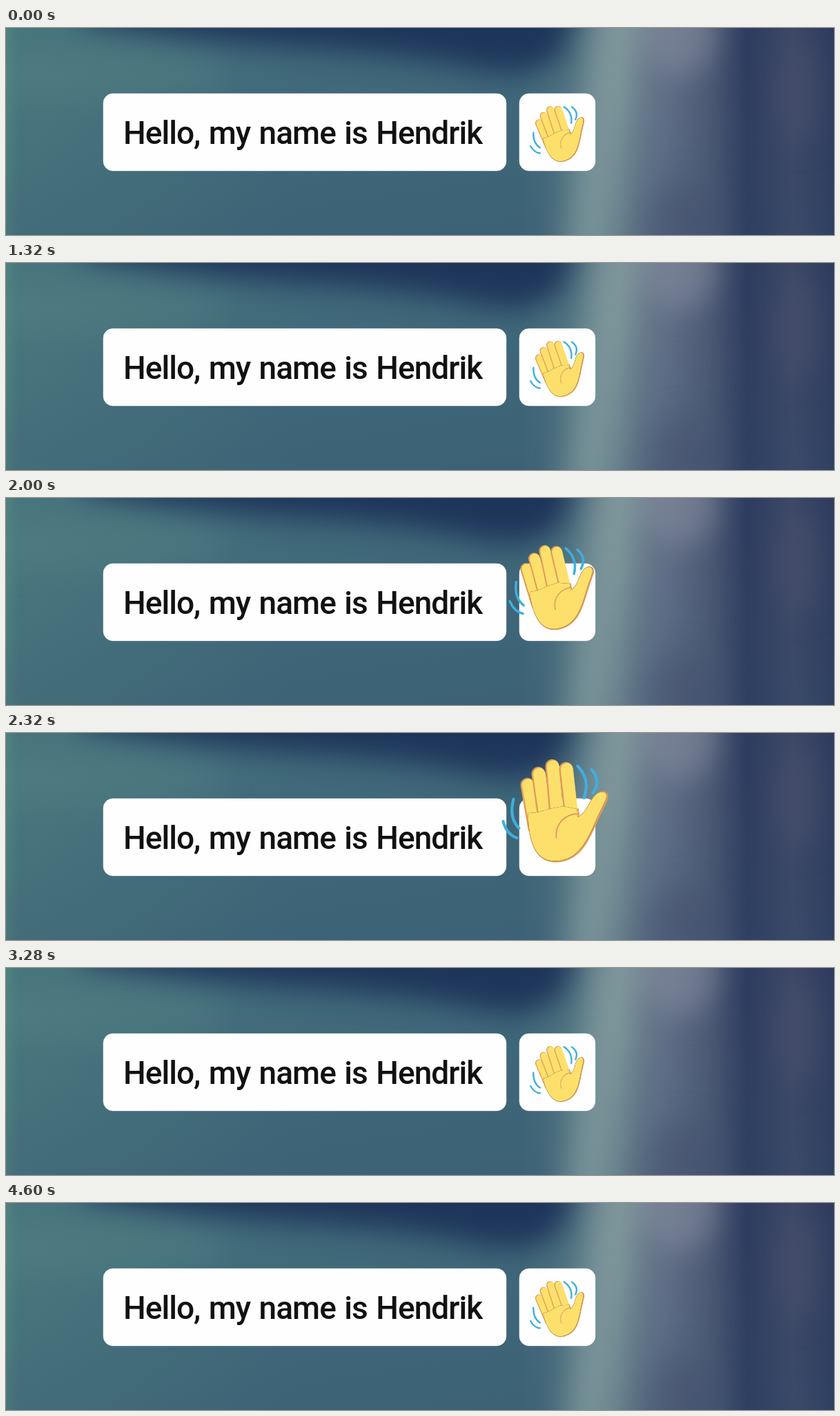
Animation of 1200x300 px, one loop 4960 ms. Source, as an HTML page:

```html
<!DOCTYPE html>
<html lang="en">
<head>
<meta charset="utf-8">
<title>Hello</title>
<style>
  html, body { margin: 0; width: 100%; height: 100%; overflow: hidden; background: #3f6678; }
  svg { display: block; width: 100vw; height: 100vh; }
  text { font: 500 46px Roboto, "Open Sans", sans-serif; letter-spacing: -1px; word-spacing: 2px; fill: #111; }
  .line { fill: none; stroke-linecap: round; stroke-linejoin: round; }
</style>
</head>
<body>
<svg viewBox="0 0 1200 300" preserveAspectRatio="none">
  <defs>
    <linearGradient id="base">
      <stop offset="0" stop-color="#50827f"/>
      <stop offset=".015" stop-color="#48767d"/>
      <stop offset=".35" stop-color="#40697a"/>
      <stop offset=".62" stop-color="#3f6779"/>
      <stop offset=".68" stop-color="#4f7280"/>
      <stop offset=".74" stop-color="#6d838f"/>
      <stop offset=".8" stop-color="#5f6d86"/>
      <stop offset=".85" stop-color="#4c5974"/>
      <stop offset=".895" stop-color="#303e60"/>
      <stop offset=".95" stop-color="#3d4867"/>
      <stop offset="1" stop-color="#2e3b5e"/>
    </linearGradient>
    <linearGradient id="shade" x2="0" y2="1">
      <stop offset=".35" stop-color="#34506c" stop-opacity="0"/>
      <stop offset="1" stop-color="#34506c" stop-opacity=".25"/>
    </linearGradient>
    <filter id="soft" x="-50%" y="-50%" width="200%" height="200%" color-interpolation-filters="sRGB">
      <feGaussianBlur stdDeviation="20"/>
    </filter>
  </defs>

  <rect width="1200" height="300" fill="url(#base)"/>
  <rect width="1200" height="300" fill="url(#shade)"/>
  <g filter="url(#soft)">
    <ellipse cx="130" cy="65" rx="190" ry="40" fill="#558285" opacity=".4"/>
    <path d="M110-60H835L808 35Q770 78 680 58T430 28T110-10Z" fill="#1e355a"/>
    <path d="M870-60H925L895 150L875 360H805L828 150Z" fill="#86a0a2" opacity=".7"/>
    <ellipse cx="975" cy="5" rx="55" ry="65" fill="#848d9d" opacity=".6"/>
    <ellipse cx="980" cy="290" rx="50" ry="70" fill="#44516f" opacity=".5"/>
    <path d="M1055-60H1095L1075 150L1110 360H1080Z" fill="#293860" opacity=".4"/>
    <ellipse cx="1150" cy="95" rx="30" ry="75" fill="#4a526e" opacity=".6"/>
  </g>

  <g fill="#fefeff" stroke="#fff" stroke-opacity=".4">
    <rect x="141" y="95" width="584" height="112" rx="14"/>
    <rect x="744" y="95" width="110" height="112" rx="14"/>
  </g>
  <text x="170" y="168">Hello, my name is Hendrik</text>

  <g id="hand">
    <g class="line" stroke="#3eafdf" stroke-width="4.2">
      <path d="M736 96Q729 123 744 138M721 128Q726 147 741 152"/>
      <path d="M829 48Q848 68 838 94M849 53Q864 69 851 87"/>
    </g>
    <use href="#palm" x="1" y=".5" class="line" stroke="#e09a58" stroke-width="3.2"/>
    <g id="fingers" class="line"></g>
    <path id="palm"
      d="M757 116C758 150 764 186 797 185.500C830 184 842 158 857 123L870 96Q873 84 862 85.500Q853 88 845 104Q838 118 829 122L828 110L808 106L788 110L771 115Z"/>
    <use href="#palm" fill="#fde06c"/>
    <path class="line" stroke="#e09a58" stroke-width="1.8" d="M831 117C811 117 796 131 798 152"/>
  </g>
</svg>
<script>
const LOOP = 4960, STEP = 40;
const hand = document.getElementById('hand');
document.getElementById('palm').removeAttribute('fill');

// Each finger: tip x, tip y, base x, base y
const fingers = [[756, 75, 767, 138], [772, 59, 782, 130], [792, 48, 799, 130], [812, 52, 820, 125]];
document.getElementById('fingers').innerHTML = fingers.map(([x, y, bx, by]) =>
  `<path stroke="#e09a58" stroke-width="20" d="M${x} ${y}L${bx} ${by}"/>
   <path stroke="#fde06c" stroke-width="18" d="M${x + 1.4} ${y + .6}L${bx + 1.4} ${by}"/>`).join('');

// Each key: time, centre x, centre y, scale, angle
const rest = [798.5, 153, .555, -13];
const keys = [
  [0, ...rest],
  [1660, ...rest],
  [2000, 790, 129, .83, -7],
  [2320, 795, 112, 1, 0],
  [2680, 797.5, 137.5, .665, -9],
  [3000, ...rest],
  [LOOP, ...rest]
];

// Slope through the neighbouring keys, flat where the hand rests
function slope(i, c) {
  if (i < 2 || i > keys.length - 3) return 0;
  return (keys[i + 1][c] - keys[i - 1][c]) / (keys[i + 1][0] - keys[i - 1][0]);
}

function pose(t) {
  const i = keys.findIndex((k, n) => t < keys[n + 1][0]);
  const a = keys[i], b = keys[i + 1], d = b[0] - a[0], u = (t - a[0]) / d;
  const mix = u * u * (3 - 2 * u);
  return [1, 2, 3, 4].map(c => a[c] + (b[c] - a[c]) * mix
    + d * u * (1 - u) * ((1 - u) * slope(i, c) - u * slope(i + 1, c)));
}

function draw() {
  const t = Math.floor(performance.now() % LOOP / STEP) * STEP;
  const [x, y, size, angle] = pose(t);
  hand.setAttribute('transform',
    `translate(${x} ${y}) rotate(${angle}) scale(${size}) translate(-795.5 -112)`);
  requestAnimationFrame(draw);
}
draw();
</script>
</body>
</html>
```
